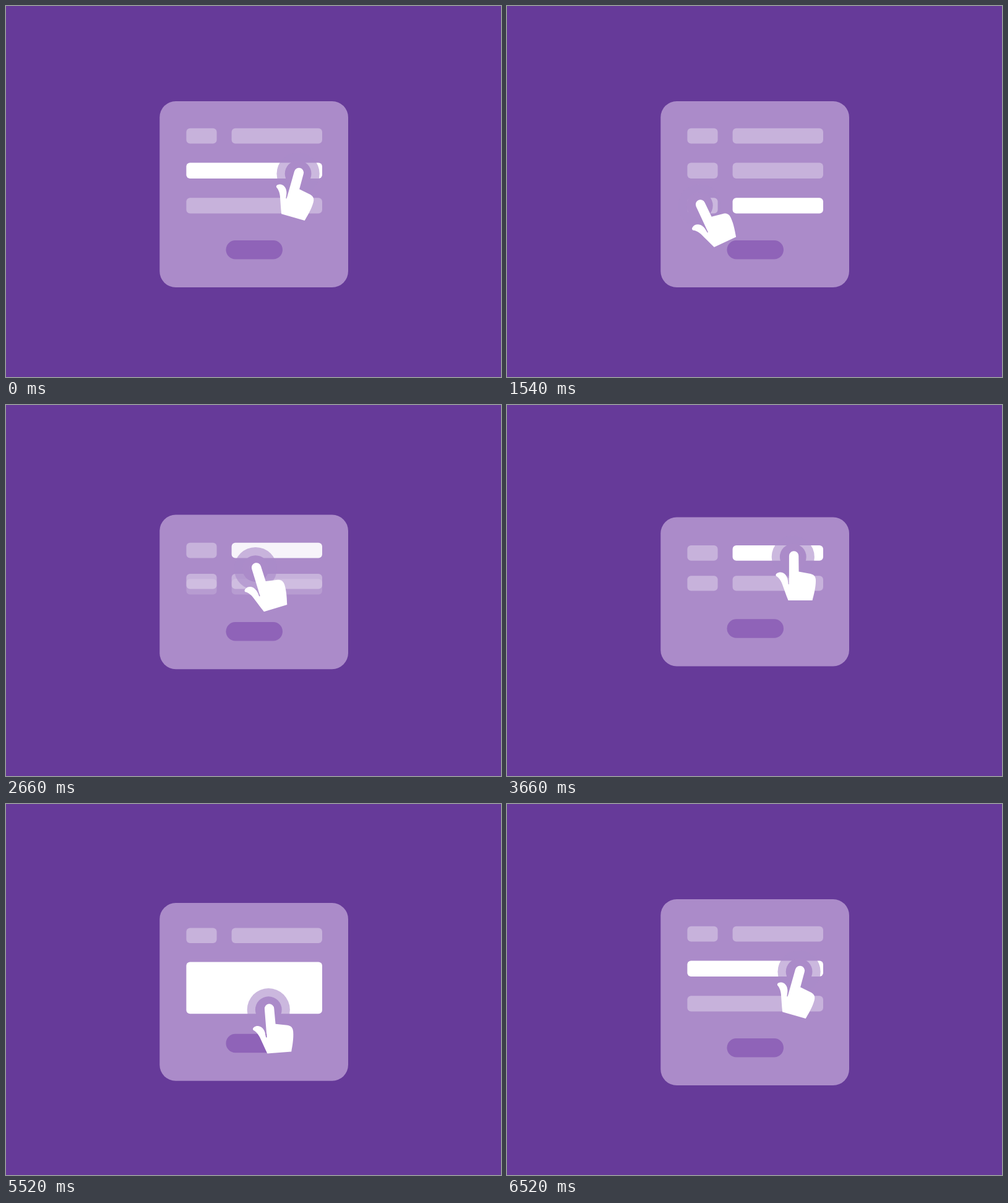
Animation, 800 px wide and 600 px high, one loop 6.64 s. Source, as an HTML page with a canvas:

```html
<!DOCTYPE html>
<html lang="en">
<head>
<meta charset="utf-8">
<title>Form gestures</title>
<style>
html, body { margin: 0; height: 100%; overflow: hidden; background: #663a99; }
canvas { display: block; }
</style>
</head>
<body>
<canvas id="stage" width="800" height="600"></canvas>
<script>
const ctx = document.getElementById('stage').getContext('2d');
const LOOP = 6640, CARD = '#ab8bc9', DIM = 1 / 3;
const LEFT = 291.4, RIGHT = 511, SPLIT = 364.6, GAP = 24;

const hand = new Path2D('M-7.7 0A7.7 7.7 0 0 1 7.7 0L8 25.5L27 29C33 30.5 35.5 34 35.5 40' +
  'C35.5 52 32 64 30 72L-9 72C-13 62-16 53-19 45C-21 39.5-25 34.5-28 33C-30 31.5-29 29-27 28' +
  'C-22.5 25-17 26.5-13.5 30.5C-10 35-9.5 40-9 46L-7.7 46Z');

// Fingertip moves: start, end, x, y, angle in degrees
const home = [473.4, 269.5, 15.8];
const moves = [
  [100, 480, 315.5, 188.7, -28],
  [700, 1280, 312, 321, -25],
  [1520, 2000, 466.3, 320.5, -16.8],
  [2340, 2780, 394, 253, -17],
  [3180, 3840, 475.6, 242.5, 3],
  [3860, 4140, 488.4, 295.5, 17.2],
  [4440, 4920, 319, 295.5, 17.2],
  [5160, 5700, 455.6, 341, -10.7],
  [6080, 6520, ...home]
];

const mix = (a, b, k) => a + (b - a) * k;

// Ease in and out between two times with the given power
function ease(t, from, to, power = 2) {
  const u = Math.min(1, Math.max(0, (t - from) / (to - from)));
  return u < .5 ? Math.pow(2 * u, power) / 2 : 1 - Math.pow(2 - 2 * u, power) / 2;
}

function box(x, y, right, bottom, radius, fill) {
  const w = right - x, h = bottom - y;
  if (w <= 0 || h <= 0) return;
  ctx.fillStyle = fill;
  ctx.beginPath();
  ctx.roundRect(x, y, w, h, Math.min(radius, w / 2, h / 2));
  ctx.fill();
}

const field = (x, y, right, bottom, alpha) =>
  box(x, y, right, bottom, 6, `rgba(255,255,255,${alpha})`);

function row(edge, top, bottom, leftAlpha, rightAlpha) {
  field(LEFT, top, edge - GAP, bottom, leftAlpha);
  field(edge, top, RIGHT, bottom, rightAlpha);
}

function drawForm(t) {
  const shrink = ease(t, 2340, 2780);
  const small = shrink - ease(t, 5160, 5700);
  const rowShift = shrink - ease(t, 5160, 5617);
  const swipe = ease(t, 700, 1280);
  const hop = ease(t, 3860, 4140);

  box(248.3, 154 + 27.6 * small, 553, 455 - 32.6 * small, 26, CARD);
  const button = 379 - 32.7 * small;
  box(355.5, button, 447, button + 30.4, 15.2, '#8f63b8');

  const dip = 3.5 * Math.sin(Math.PI * Math.min(1, Math.max(0, (t - 700) / 580)));
  const top1 = 197.8 + 29.3 * rowShift;
  row(SPLIT - dip, top1, top1 + 24.6, DIM, mix(DIM, 1, shrink - hop));

  const split2 = ease(t, 700, 1280, 4) - ease(t, 4600, 4920);
  const top2 = 253.5 + 22.7 * rowShift;
  const bottom2 = 279 + 21.6 * shrink + 49.4 * ease(t, 5160, 5700) - 71 * ease(t, 6080, 6520);
  row(mix(LEFT, SPLIT, split2), top2, bottom2, mix(1, DIM, swipe), mix(1, DIM, swipe - hop));

  if (t < 2780) {
    const top3 = 310.2 - 34 * shrink;
    const alpha = mix(DIM, 1, swipe) * (1 - shrink);
    row(mix(LEFT, SPLIT, ease(t, 760, 1280, 4)), top3, top3 + 25.4, alpha, alpha);
  } else if (t > 6080) {
    field(LEFT, bottom2 + 31.2, RIGHT, 335.6, DIM);
  }
}

function drawHand(t) {
  let pose = home;
  for (const [from, to, ...next] of moves) {
    const k = ease(t, from, to);
    pose = pose.map((v, i) => mix(v, next[i], k));
  }
  const [x, y, angle] = pose;
  const press = 1 - ease(t, 100, 240) + ease(t, 1120, 1280);
  ctx.fillStyle = CARD;
  for (const [radius, alpha] of [[34.6, .61], [21.4, 1]]) {
    ctx.globalAlpha = alpha;
    ctx.beginPath();
    ctx.arc(x - 1.3, y + 1.7, radius * press, 0, 2 * Math.PI);
    // The touch ring only marks the form fields
    ctx.fill();
  }
  ctx.globalAlpha = 1;
  ctx.save();
  ctx.translate(x, y);
  ctx.rotate(angle * Math.PI / 180);
  ctx.fillStyle = '#fff';
  ctx.fill(hand);
  ctx.restore();
}

function frame() {
  const t = performance.now() % LOOP;
  ctx.fillStyle = '#663a99';
  ctx.fillRect(0, 0, 800, 600);
  drawForm(t);
  drawHand(t);
  requestAnimationFrame(frame);
}
frame();
</script>
</body>
</html>
```
